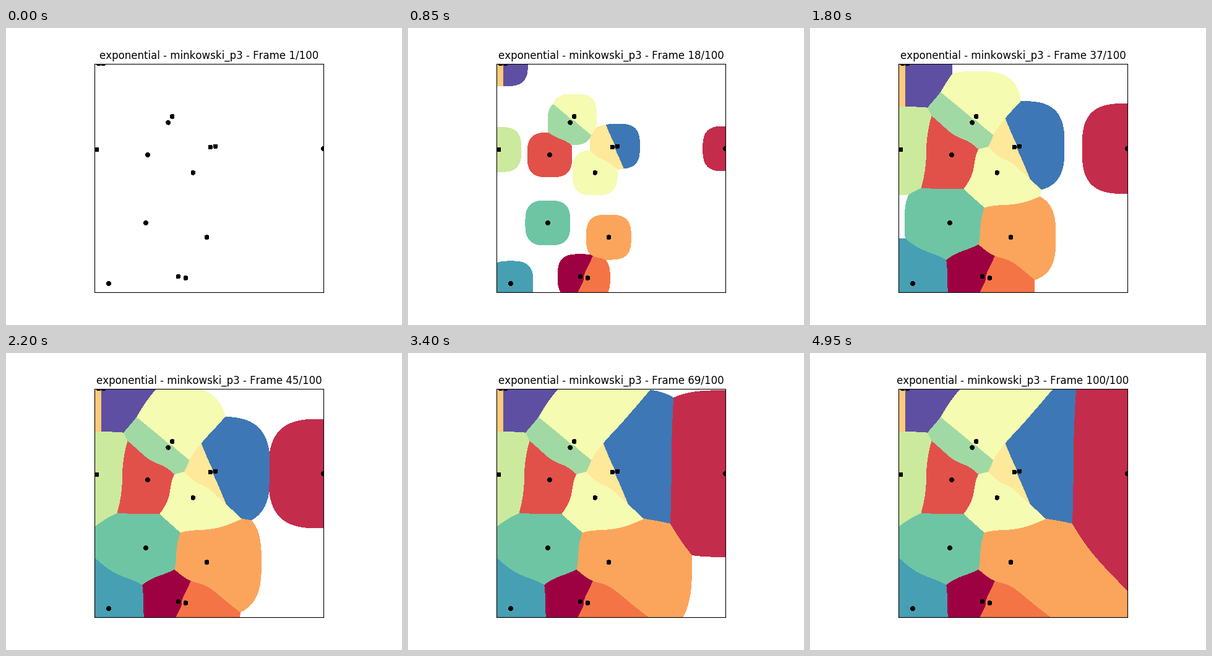
These frames come from a looping animation (640x480 px, 5 s). A matplotlib script:

```python
import numpy as np
import matplotlib.pyplot as plt
from matplotlib.animation import FuncAnimation

plt.rcParams["text.kerning_factor"] = 6

FRAMES = 100
INTERVAL = 50

# Plot area in stage pixels, y pointing down
LEFT, RIGHT, TOP, BOTTOM = 143.2, 512.8, 57.6, 427.2
SIDE = RIGHT - LEFT
GRID = 370

# Cell seeds, in the order of the colormap
SEEDS = [
    (278.3, 401.8), (RIGHT, 195), (229, 205), (290.3, 404), (324.3, 338.1),
    (149.7, TOP), (330.2, 192.6), (302.2, 233.9), (268.7, 143), (146.8, 196.5),
    (262.1, 152.9), (225.9, 315), (166, 412.9), (338.4, 191.2), (157.3, TOP),
]


def minkowski(x, y, seed, p=3):
    dx, dy = np.abs(x - seed[0]), np.abs(y - seed[1])
    return (dx ** p + dy ** p) ** (1 / p)


steps = np.arange(GRID) + 0.5
gx, gy = np.meshgrid(int(LEFT) + steps, int(TOP) + steps)
dist = np.array([minkowski(gx, gy, s) for s in SEEDS])
nearest = dist.min(axis=0)

# The two middle cells share one pale yellow
shade = np.arange(len(SEEDS), dtype=float)
shade[7:9] = 7.5
colors = plt.get_cmap("Spectral")(shade / shade[-1])[:, :3]

# The grown region reaches the farthest corner in the last frame
radii = np.linspace(0.01 * SIDE, nearest.max(), FRAMES)
cells = colors[dist.argmin(axis=0)]
cells[nearest <= radii[0]] = 0

fig, ax = plt.subplots(figsize=(6.4, 4.8), dpi=100)
image = ax.imshow(np.ones_like(cells), extent=(LEFT, RIGHT, BOTTOM, TOP),
                  interpolation="nearest")
ax.set_xticks([])
ax.set_yticks([])
title = ax.set_title("")


def update(i):
    grown = nearest <= radii[i]
    image.set_data(np.where(grown[..., None], cells, 1))
    title.set_text(f"exponential - minkowski_p3 - Frame {i + 1}/{FRAMES}")
    return image, title


anim = FuncAnimation(fig, update, frames=FRAMES, interval=INTERVAL,
                     repeat=True, repeat_delay=0)
plt.show()
```
